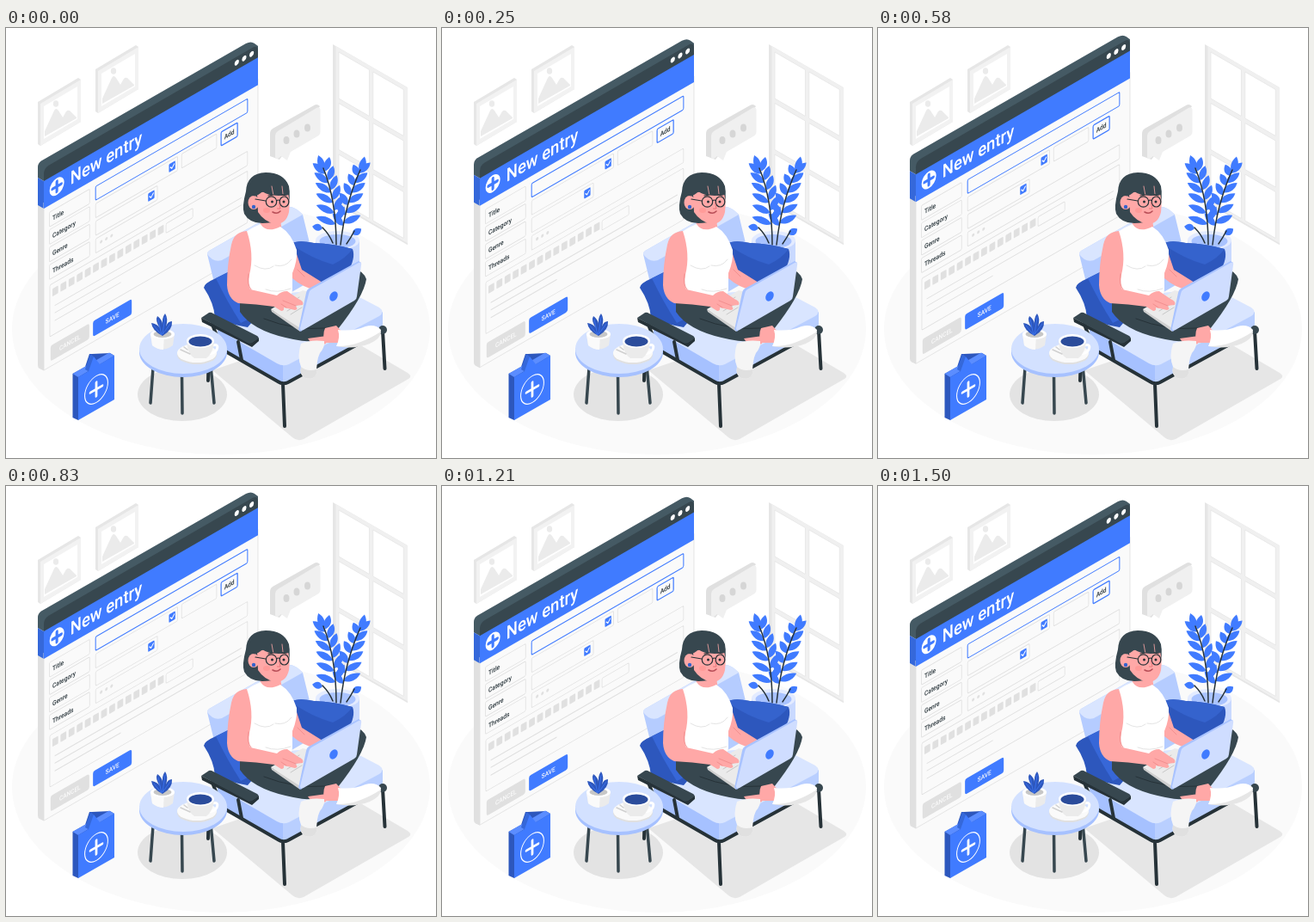
An HTML page for the animation above (1540 ms loop, 500 by 500 pixels).

```html
<!DOCTYPE html>
<html lang="en">
<head>
<meta charset="utf-8">
<title>New entry</title>
<style>
html, body { margin: 0; width: 100%; height: 100%; overflow: hidden; background: #fff; }
svg { display: block; width: 100vw; height: 100vh; }
text { font-family: Roboto, sans-serif; font-weight: 500; }
#win { animation: float 1540ms linear infinite; }
@keyframes float {
  0%, 97.4% { transform: translateY(0); }
  48.7% { transform: translateY(-10px); }
  100% { transform: translateY(0); }
}
.ink { fill: #263238; }
.slate { fill: #37474f; }
.blue { fill: #407bff; }
.skin { fill: #ffa8a7; }
.field { fill: #fafafa; stroke: #e0e0e0; stroke-width: .9; }
.line { fill: none; stroke-linecap: round; stroke-linejoin: round; }
.label { font-size: 7.7px; fill: #263238; }
</style>
</head>
<body>
<svg viewBox="0 0 500 500">
  <defs>
    <path id="leaf" d="M0 0C4-5 12-6 20-1C14 5 6 5 0 0Z"/>
    <g id="picture">
      <path fill="#e6e6e6" d="M37 86L84 58L87 60V109L40 137L37 135Z"/>
      <path fill="#f2f2f2" d="M40 88L87 60V109L40 137Z"/>
      <path fill="#fff" d="M44 91L83 68V106L44 129Z"/>
      <path fill="#ebebeb" d="M45 126V120L56 96Q58 92 61 96L66 104L70 97Q73 94 76 98L82 104V105Z"/>
      <ellipse cx="58" cy="88" rx="3.2" ry="3.8" fill="#ebebeb"/>
    </g>
  </defs>

  <!-- room -->
  <ellipse cx="250" cy="350" rx="243" ry="146" fill="#fafafa"/>
  <use href="#picture"/>
  <use href="#picture" x="67" y="-38"/>
  <g transform="matrix(.866 .5 0 1 380 19)">
    <path fill="#e6e6e6" d="M0 0H100.5V183H0Z"/>
    <path fill="#f0f0f0" d="M4 0H100.5V181H4Z"/>
    <g id="panes"></g>
  </g>

  <!-- floating window -->
  <g id="win">
    <path fill="#e0e0e0" d="M37 200L44 204V398.500L39 396Q37 395 37 392Z"/>
    <path fill="#455a64" d="M37 174V162Q37 157 41 154.500L279 18Q285 15 289 18L293 21V40L44 178Z"/>
    <path fill="#3568da" d="M37 174L44 178V210L37 206Z"/>
    <g transform="matrix(.866 -.5 0 1 44 163)">
      <path fill="#fafafa" stroke="#e0e0e0" stroke-width=".8" d="M0 40H287.500V235H0Z"/>
      <path class="slate" d="M0 16V7Q0 0 7 0H280Q287.500 0 287.500 8V16Z"/>
      <path class="blue" d="M0 15H287.500V47H0Z"/>
      <g fill="#fff">
        <circle cx="259" cy="6.800" r="3"/><circle cx="269" cy="6.800" r="3"/><circle cx="279" cy="6.800" r="3"/>
        <circle cx="17.500" cy="30" r="9.800"/>
        <text x="35.500" y="37.300" font-size="21.400">New entry</text>
      </g>
      <path class="line" stroke="#407bff" stroke-width="3.600" d="M11.500 30H23.500M17.500 24V36"/>

      <g id="labels"></g>
      <rect class="field" x="69.500" y="56" width="204" height="16" rx="1.500" style="stroke:#407bff;stroke-width:1.2"/>
      <rect class="field" x="69.500" y="76" width="110" height="16.500" rx="1.500"/>
      <rect class="field" x="185" y="76" width="47" height="16.500" rx="1.500"/>
      <rect class="field" x="238" y="77" width="22" height="16" rx="1.500" style="stroke:#407bff;stroke-width:1.4"/>
      <text class="label" x="249" y="87.700" text-anchor="middle">Add</text>
      <rect class="field" x="69.500" y="96.500" width="83" height="16.500" rx="1.500"/>
      <rect class="field" x="69.500" y="117" width="204" height="16.500" rx="1.500"/>
      <g class="blue"><rect x="168" y="79.500" width="8.500" height="9.500" rx="1"/><rect x="140" y="99.500" width="8.500" height="9.500" rx="1"/></g>
      <path class="line" stroke="#fff" stroke-width="1.300" d="M170 84L172 86.200L175 82.500M142 104L144 106.200L147 102.500"/>
      <g fill="#e0e0e0"><circle cx="77" cy="124" r="1.800"/><circle cx="84" cy="124" r="1.800"/><circle cx="91" cy="124" r="1.800"/></g>
      <rect class="field" x="8" y="140" width="265.500" height="60" rx="1.500"/>
      <g id="swatches" fill="#e0e0e0"></g>
      <rect class="field" x="164" y="146.500" width="36" height="11" rx="1.500"/>
      <path class="line" stroke="#e0e0e0" stroke-width="1.200" d="M15 167H265M15 175.500H265M15 184.500H103"/>
      <rect x="9" y="211" width="52" height="18" rx="2.500" fill="#e0e0e0"/>
      <rect class="blue" x="66" y="211" width="52" height="18" rx="2.500"/>
      <g fill="#fafafa" font-size="7.500" text-anchor="middle">
        <text x="35" y="222.800">CANCEL</text><text x="92" y="222.800">SAVE</text>
      </g>
    </g>
  </g>

  <!-- speech bubble -->
  <path fill="#e0e0e0" d="M307 123Q307 119 310 117L359 89.500Q362 88 365 91L318 153L307 149Z"/>
  <path fill="#f0f0f0" d="M313 125Q313 122 316 120L361 93Q365.500 91 365.500 95V121Q365.500 124 362 126L331 144L327 154L320 149L316 152Q313 153 313 149Z"/>
  <g fill="#d6d6d6"><ellipse cx="326" cy="130.500" rx="3.500" ry="4.500"/><ellipse cx="338" cy="123" rx="3.500" ry="4.500"/><ellipse cx="350.500" cy="116" rx="3.500" ry="4.500"/></g>

  <!-- tall plant -->
  <path fill="#c9d9ff" d="M360 247V285H411V247Z"/>
  <ellipse cx="385.500" cy="247" rx="25.500" ry="11" fill="#e3ebff"/>
  <ellipse cx="385.500" cy="248" rx="21" ry="8" fill="#a9c3ff"/>
  <g id="plant" class="blue"></g>
  <path class="line" stroke="#263238" stroke-width="1.500" d="M384 252Q384 200 369 163M389 252Q394 205 412 165M380 250Q376 240 368 232M396 251Q401 244 405 236"/>

  <!-- shadows -->
  <path fill="#e6e6e6" d="M240 398L333 476Q339 481 346 478L468 408Q473 405 467 401L380 350Z"/>
  <ellipse cx="205" cy="426" rx="52" ry="31" fill="#e3e3e3"/>

  <!-- armchair -->
  <path fill="#b5ccff" d="M234 263Q234 260 238 258L324 209Q334 205 345 217L353 250V295L270 343L243 300Z"/>
  <path fill="#d9e5ff" d="M234 263Q234 260 238 258L324 209Q334 205 345 217L251 270Q241 273 234 263Z"/>
  <path class="line ink" stroke="#263238" stroke-width="4" d="M236 372L235 410"/>
  <path fill="#a6c1ff" d="M246 350L322 390V414L254 376Q247 372 246 366Z"/>
  <path fill="#b9cfff" d="M322 390L438 330V350L322 414Z"/>
  <path fill="#d9e5ff" d="M246 350L310 310L390 302L434 325Q441 330 434 335L329 391Q322 394 315 390Z"/>
  <path class="line" stroke="#263238" stroke-width="4" d="M250 373L316 411Q322 415 328 412L438 352M322 414L324 463M438 352L440.500 396"/>
  <circle class="slate" cx="438" cy="351" r="5"/>
  <path fill="#2d57bd" d="M230 302Q230 297 244 291L264 281L292 335L281 348Q262 345 243 337Q242 320 230 302Z"/>
  <path fill="#3767d8" d="M244 291L264 281L291 334L273 343Q257 318 244 291Z"/>
  <path fill="#2d57bd" d="M331 251Q339 246 358 250Q382 251 403 257Q407 268 397 284L367 304L338 292Z"/>
  <path fill="#3563cd" d="M331 251Q339 246 358 250Q382 251 403 257Q395 268 380 275Q355 268 331 251Z"/>

  <!-- legs -->
  <path class="slate" d="M352 305L404 279Q416 283 419 292Q416 312 386 350L362 343Z"/>
  <path class="slate" d="M272 320Q290 310 332 314L356 338L384 348Q388 355 378 364Q353 367 325 360Q286 351 272 330Z"/>
  <path class="line" stroke="#263238" stroke-width="1" d="M300 338Q335 352 372 349"/>
  <path class="skin" d="M371 349L384 346L394 357L390 366L372 366Q367 358 371 349Z"/>
  <path fill="#fff" d="M386 351Q404 353 418 347Q430 344 436 351Q437 359 424 365Q408 372 384 370Q389 360 386 351Z"/>
  <path fill="#e6e6e6" d="M384 370Q408 371 436 353Q436 361 423 367Q405 374 384 370Z"/>
  <path class="skin" d="M351 361L373 358L372 367L358 371Z"/>
  <path fill="#f5f5f5" d="M343 367Q354 362 370 364Q371 371 365 378Q361 386 361 402Q358 410 348 407Q341 404 343 394Q338 382 343 367Z"/>
  <path fill="#e0e0e0" d="M343 394Q350 400 361 397V402Q358 410 348 407Q341 404 343 394Z"/>

  <!-- body -->
  <path class="skin" d="M322 240Q333 246 338 263L344 281L368 296L364 306Q345 302 333 291Z"/>
  <path class="skin" d="M297 215L319 222L321 238Q311 246 295 235Z"/>
  <path fill="#fff" d="M279 237Q288 231 296 228Q303 239 319 231Q332 239 338 258Q339 271 333 285V302Q334 311 325 315Q300 323 281 314Q281 290 274 268Z"/>
  <path class="line" stroke="#e0e0e0" stroke-width=".9" d="M289 276Q302 284 311 277M313 276Q325 279 332 269M302 304Q315 309 331 303"/>

  <!-- laptop -->
  <path fill="#ebebeb" d="M308 327L345 305L353 307L342 352Z"/>
  <path fill="#cfcfcf" d="M308 327L342 349V353L309 330Z"/>
  <path class="line" stroke="#c7c7c7" d="M321 325L341 313M327 329L344 319M331 333L344 325"/>
  <path fill="#a9c3ff" d="M349 308Q349 305 352 303L410 271L413 273L343 353L340 351Z"/>
  <path fill="#cfddff" d="M352 309Q352 306 355 304L410 273Q414 271 413 276L408 312Q408 315 405 317L346 351Q342 353 342 349Z"/>
  <ellipse class="blue" cx="381" cy="312" rx="4.300" ry="6" transform="rotate(30 381 312)"/>

  <!-- near arm -->
  <path class="skin" d="M280 236Q265 237 262 252Q257 275 257 299Q258 315 270 320Q291 321 312 324L320 329Q324 329 323 325L336 328Q341 327 336 323L345 322Q347 318 340 315L327 306Q320 306 315 311L284 304Q281 300 283 287Q289 263 280 236Z"/>
  <path class="line" stroke="#f28f8f" d="M282 286Q280 299 285 304M322 317L337 323M320 321L326 325M339 281L347 289"/>

  <!-- head -->
  <path class="slate" d="M279 190Q280 169 302 168Q323 168 329 184Q331 195 328 213Q319 227 298 227Q283 227 277 216Q274 208 279 190Z"/>
  <path class="skin" d="M292 192L326 186Q331 199 329 214Q326 228 313 228Q300 225 293 214Z"/>
  <ellipse class="skin" cx="288" cy="203" rx="6.500" ry="8"/>
  <path class="slate" d="M287 195Q293 196 298 190Q307 197 329 194Q331 177 315 171Q288 166 282 188Z"/>
  <path class="line" stroke="#ffa8a7" stroke-width=".8" d="M309 184L311 195M321 184L322 193"/>
  <circle cx="288" cy="208" r="2.200" fill="#3563cd"/>
  <g class="line" stroke="#263238" stroke-width="1.200">
    <circle cx="308.500" cy="202" r="6.200"/><ellipse cx="323.500" cy="202" rx="5.300" ry="6"/>
    <path d="M314.500 201Q317 199 318.500 201M302 201L290 199M305 195L311 194M321 194L326 195"/>
  </g>
  <g class="ink"><circle cx="309.500" cy="202" r="1.500"/><circle cx="323" cy="202" r="1.500"/></g>
  <path class="line" stroke="#e7777b" d="M317.500 203L319 210L315.500 210"/>
  <path class="line" stroke="#b94f58" stroke-width="1.600" d="M310 214Q315 217 319 213"/>
  <ellipse cx="303" cy="212" rx="4" ry="3" fill="#ff928f" opacity=".6"/>

  <!-- armrest -->
  <path class="line" stroke="#263238" stroke-width="4" d="M240 345L251 373M270 365L274 386"/>
  <path class="ink" d="M227 337L285 366L294 360V364L286 371L228 342Z"/>
  <path class="slate" d="M227 337L236 331Q238 330 241 332L292 358Q295 360 292 362L286 366Q284 367 281 366Z"/>

  <!-- side table -->
  <path class="line" stroke="#37474f" stroke-width="3.500" d="M171 395L168 436M204.500 402L205 448M238 392L242 436"/>
  <path fill="#a6c1ff" d="M155 372V377A51 29 0 0 0 257 377V372Z"/>
  <ellipse cx="206" cy="373" rx="51" ry="29" fill="#d3e1ff"/>
  <path fill="#ebebeb" d="M168 356L170 369Q182 378 194 369L196 356Z"/>
  <path fill="#fafafa" d="M168 356L170 369Q176 374 183 374L184 356Z"/>
  <ellipse cx="182" cy="356" rx="14" ry="6" fill="#fff"/>
  <ellipse cx="182" cy="356" rx="10.500" ry="4" fill="#c7c7c7"/>
  <path fill="#2d57bd" d="M182 358Q170 352 169 343Q176 344 179 349Q173 340 176 335Q182 339 182 346Q181 337 185 332Q189 338 186 347Q188 341 193 341Q194 351 182 358Z"/>
  <path class="line" stroke="#407bff" stroke-width=".7" d="M172 346L181 357L177 339M185 336L182 356L191 344"/>
  <ellipse cx="222" cy="380" rx="23" ry="11" fill="#e0e0e0"/>
  <ellipse cx="222" cy="378" rx="23" ry="11" fill="#fafafa"/>
  <path class="line" stroke="#fff" stroke-width="3" d="M240 369Q248 367 245 374Q243 378 236 379"/>
  <path fill="#ebebeb" d="M210 364Q211 379 219 384H233Q241 378 242 364Z"/>
  <ellipse cx="226" cy="364" rx="16" ry="8" fill="#fff"/>
  <ellipse cx="226" cy="364.500" rx="13.500" ry="6" fill="#2b4c9b"/>
  <path class="line" stroke="#d0d0d0" stroke-width="1.500" d="M203 374L214 379M207 371L211 374"/>

  <!-- tag -->
  <path fill="#2d57bd" d="M77.500 402L92 394L97 379L100 379L121 378L126 381L84 456L77.500 453Z"/>
  <path fill="#5b8dff" d="M77.500 402L120 377.500L126 381L84 406Z"/>
  <path fill="#3568da" d="M92 397L98 379L102 382L99 401Z"/>
  <path class="blue" d="M84 406L96 399L102 382L109 391L126 381V432L84 456Z"/>
  <g transform="matrix(.866 -.5 0 1 105 420)" class="line" stroke="#fff">
    <circle r="15.500" stroke-width="1.200"/>
    <path stroke-width="3.200" d="M-8 0H8M0-8V8"/>
  </g>
</svg>
<script>
const add = (id, markup) => document.getElementById(id).innerHTML += markup;

for (let row = 0; row < 3; row++)
  for (let col = 0; col < 2; col++)
    add('panes', `<rect x="${8 + col * 46}" y="${5 + row * 59.5}" width="41" height="54" fill="#fff" stroke="#e6e6e6" stroke-width=".8"/>`);

['Title', 'Category', 'Genre', 'Threads'].forEach((name, i) => {
  const y = 55 + i * 20.4;
  add('labels', `<rect class="field" x="7.500" y="${y}" width="54" height="17" rx="1.500"/>
    <text class="label" x="11.500" y="${y + 11.8}">${name}</text>`);
});

for (let i = 0; i < 14; i++)
  add('swatches', `<rect x="${11.5 + i * 10.9}" y="146" width="7.800" height="9" rx="1"/>`);

// Leaves in pairs along a quadratic stem
const mix = (a, b, c, t) => (1 - t) ** 2 * a + 2 * t * (1 - t) * b + t * t * c;
const leaf = (x, y, turn, size) =>
  add('plant', `<use href="#leaf" transform="translate(${x} ${y}) rotate(${turn}) scale(${size} 1)"/>`);

function branch([x0, x1, x2], [y0, y1, y2], left, right) {
  for (let i = 0; i < 6; i++) {
    const t = .24 + i * .135;
    const x = mix(x0, x1, x2, t), y = mix(y0, y1, y2, t);
    leaf(x, y, left.turn + i * 4, left.size - i * .05);
    leaf(x, y - 3, right.turn - i * 3, right.size - i * .03);
  }
  leaf(x2, y2 + 3, x2 < x0 ? -105 : -72, .95);
}
branch([384, 384, 369], [252, 200, 163], { turn: -158, size: 1.2 }, { turn: -56, size: 1 });
branch([389, 394, 412], [252, 205, 165], { turn: -128, size: .95 }, { turn: -22, size: 1.1 });
leaf(368, 233, -165, .6);
leaf(403, 240, -28, .6);
</script>
</body>
</html>
```
